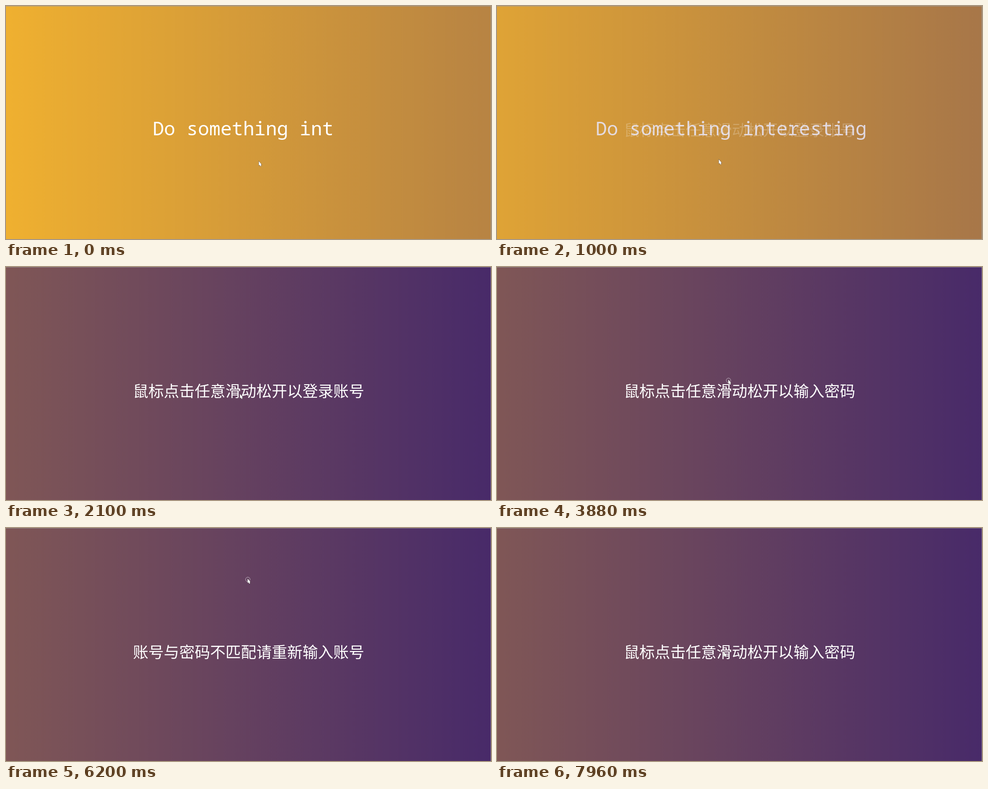
An HTML page with a canvas that plays this animation: 1079x519 px, repeating every 7.99 s.

```html
<!DOCTYPE html>
<html lang="zh-CN">
<head>
<meta charset="utf-8">
<title>Gesture login</title>
<style>
html, body { margin: 0; width: 100%; height: 100%; overflow: hidden; }
canvas { display: block; }
</style>
</head>
<body>
<canvas id="stage" width="1079" height="519"></canvas>
<script>
const W = 1079, H = 519, LOOP = 7990, FADE = 450;
const ctx = document.getElementById('stage').getContext('2d');
const MONO = '500 41.9px "Noto Sans Mono", monospace';
const HAN = '34.3px "Noto Sans CJK SC", "Noto Sans CJK", sans-serif';
const TITLE = 'Do something interesting';
const ASK_PASS = '鼠标点击任意滑动松开以输入密码';

const prompts = [
  { text: '鼠标点击任意滑动松开以登录账号', start: 900 },
  { text: ASK_PASS, start: 2640 },
  { text: '账号与密码不匹配请重新输入账号', start: 4310 },
  { text: ASK_PASS, start: 6290 }
];

// Each move bends towards `via`; the button goes down at fraction `press`
const rest = [562, 345];
const moves = [
  { start: 940, end: 1620, via: [149, 324], to: [372, 294] },
  { start: 1800, end: 2490, via: [612, 300], to: [530, 213], press: .45 },
  { start: 2680, end: 3460, via: [380, 15], to: [500, 280] },
  { start: 3520, end: 4290, via: [488, 259], to: [590, 189], press: .45 },
  { start: 5440, end: 6200, via: [330, 400], to: [537, 112], press: .45 },
  { start: 6320, end: 7060, via: [620, 230], to: [510, 280] },
  { start: 7120, end: 7500, via: [420, 200], to: [522, 165], press: .45 },
  { start: 7500, end: 7900, via: [640, 170], to: [504, 275], press: 0 }
];
const arrow = new Path2D('M0 0V10L2 8.5L3.5 11.5L5.5 11L4.5 8H6.5Z');

const progress = (t, start, span) => Math.max(0, Math.min(1, (t - start) / span));
const mix = (a, b, k) => a + (b - a) * k;
const ease = x => 1 - (1 - x ** 1.3) ** 3;

function drawBackground(shift) {
  const left = -2 * W * shift;
  const g = ctx.createLinearGradient(left, 0, left + 3 * W, 0);
  g.addColorStop(0, 'rgb(239,176,48)');
  g.addColorStop(1, 'rgb(72,42,105)');
  ctx.fillStyle = g;
  ctx.fillRect(0, 0, W, H);
  ctx.fillStyle = 'rgba(155,155,155,.7)';
  ctx.fillRect(0, 0, W, 1);
  ctx.fillRect(W - 1, 0, 1, H);
}

function drawText(text, font, color, alpha, x, y) {
  ctx.globalAlpha = alpha;
  ctx.font = font;
  ctx.fillStyle = color;
  ctx.fillText(text, x, y);
  ctx.globalAlpha = 1;
}

function drawTitle(t, fade) {
  const typed = TITLE.slice(0, 16 + Math.floor((t + 10) / 100));
  const tint = [80, 75, 222].map(c => Math.round(mix(255, c, fade)));
  drawText(typed, MONO, `rgb(${tint})`, 1 - fade, Math.max(218, 326.5 - .107 * t), 288);
}

function drawPrompts(t) {
  prompts.forEach(({ text, start }, i) => {
    const end = prompts[i + 1]?.start ?? LOOP;
    const alpha = progress(t, start, FADE) * (1 - progress(t, end, FADE));
    drawText(text, HAN, '#fff', alpha, 282.5, 289);
  });
}

function pointerAt(t) {
  let pos = rest, down = false;
  for (const { start, end, via, to, press } of moves) {
    if (t < start) break;
    const k = progress(t, start, end - start);
    pos = pos.map((p, i) => mix(mix(p, via[i], k), mix(via[i], to[i], k), k));
    down = k >= press && t < end + 60;
  }
  return { pos, down };
}

function drawPointer(t) {
  const { pos: [x, y], down } = pointerAt(t);
  ctx.save();
  ctx.translate(Math.round(x) + .5, Math.round(y) + .5);
  if (down) {
    ctx.strokeStyle = 'rgba(205,195,205,.9)';
    ctx.beginPath();
    ctx.arc(.5, 2, 5, 0, 7);
    ctx.stroke();
  }
  ctx.strokeStyle = 'rgba(40,30,30,.8)';
  ctx.stroke(arrow);
  ctx.fillStyle = '#fff';
  ctx.fill(arrow);
  ctx.restore();
}

function frame(now) {
  const t = now % LOOP;
  const slide = ease(progress(t, 920, 800));
  drawBackground(slide);
  drawTitle(t, slide);
  drawPrompts(t);
  drawPointer(t);
  requestAnimationFrame(frame);
}
requestAnimationFrame(frame);
</script>
</body>
</html>
```
